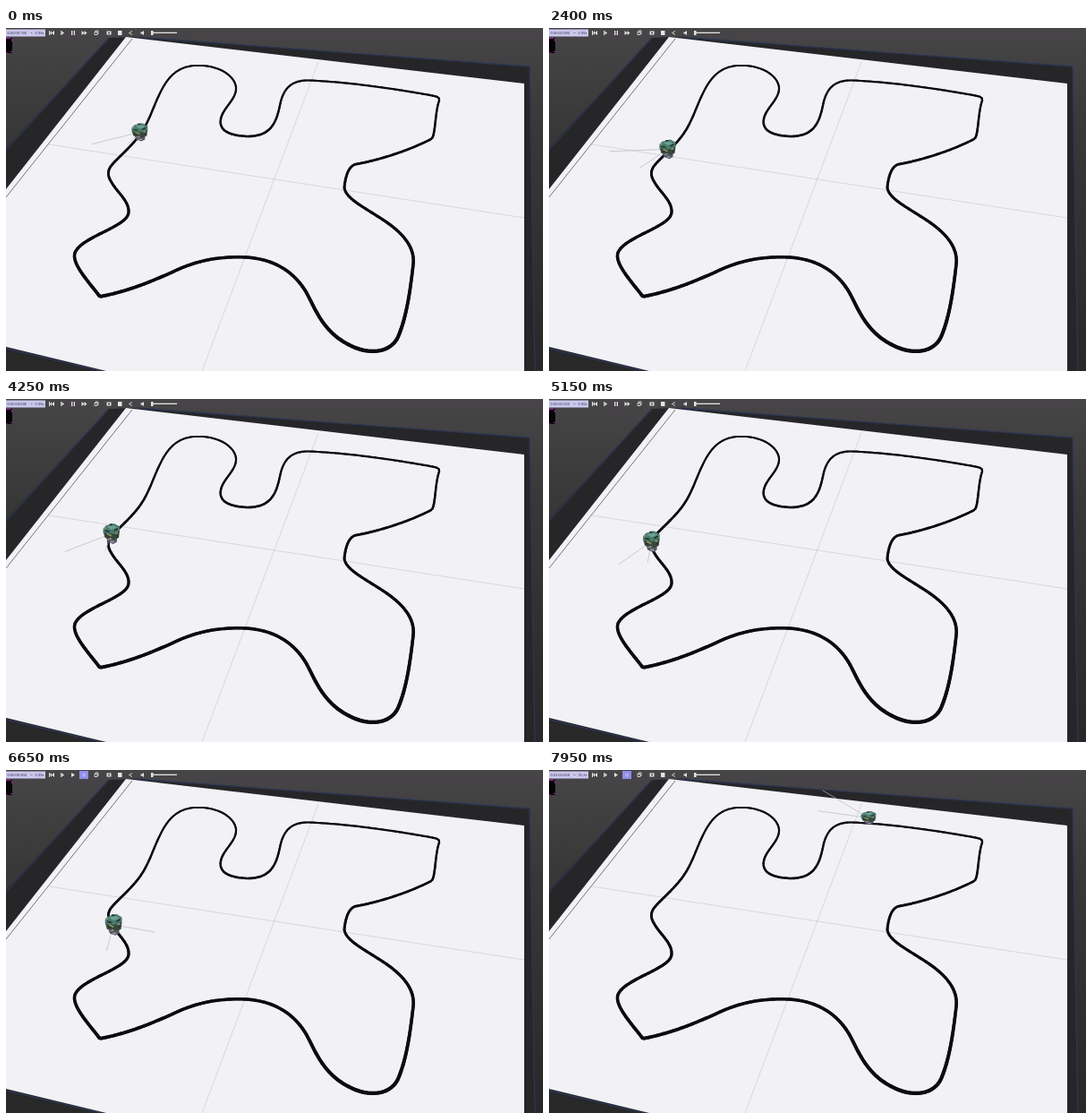
Write an HTML page that moves like this. It is 600x383 px and loops after 8000 ms.

```html
<!DOCTYPE html>
<html lang="en">
<head>
<meta charset="utf-8">
<title>Line follower</title>
<style>
  html, body { margin: 0; width: 100%; height: 100%; overflow: hidden; background: #333; }
  svg { display: block; width: 100%; height: 100%; }
  text { font: 4.1px "Liberation Sans", Arial, sans-serif; fill: #34324d; }
</style>
</head>
<body>
<svg viewBox="0 0 600 383">
  <defs>
    <linearGradient id="room" x2="0" y2="1">
      <stop offset="0" stop-color="#474547"/>
      <stop offset=".3" stop-color="#383838"/>
      <stop offset="1" stop-color="#282828"/>
    </linearGradient>
  </defs>
  <rect width="600" height="383" fill="url(#room)"/>

  <!-- Arena -->
  <path d="M115 11L146 10L585 43L591 383H100L0 361V134Z" fill="#262628"/>
  <path d="M115 11L0 136M146 10L585 43L591 383M0 358L106 383" fill="none" stroke="#2c3554" stroke-width="1.4"/>
  <path d="M134 10L579 62V383H112L0 356V180Z" fill="#f2f1f6"/>
  <path d="M141 12L0 189" stroke="#55555a" stroke-width=".8"/>
  <path d="M48 130L579 212M349 38L219 383" stroke="#bfbec5" stroke-width=".6" stroke-dasharray="3 .5"/>
  <path id="track" fill="none" d="M153 114C143 130 129 141 119 152C111 161 115 168 119 174
    C125 184 138 194 137 206C136 222 84 233 77 251C73 263 92 283 105 300
    C140 293 165 282 196 268C220 258 243 255 268 256C300 258 322 272 336 296
    C347 317 356 342 388 356C408 365 430 362 438 345C448 322 452 290 455 264
    C458 238 431 220 414 209.5C396 198 379 189 378 178C379 168 382 154 391 152
    C415 148 450 137 475 124C480 122 479 95 484 81C485 77 480 76 474 75
    C440 69 390 61 340 58.5C322 58 312 64 307 82C303 100 300 121 270 121
    C245 120 236 112 241 98C246 86 258 78 257 66C255 52 236 41 213 42
    C190 42 179 58 172 73C165 87 161 101 153 114Z"/>
  <g id="line" stroke="#0b0b12" stroke-linecap="round"></g>

  <!-- Robot -->
  <path id="rays" fill="none" stroke="#b9b9bd" stroke-width=".7"/>
  <g id="robot">
    <path d="M-6 3L6 2L6 8L2 10L-4 8Z" fill="#555663"/>
    <path d="M-4 5L3 5M-1 8H3" stroke="#a3a2af" stroke-width="1.3"/>
    <path d="M-9 -2L9 -3L8 4L3 6L-7 4Z" fill="#37483f"/>
    <path d="M-6 -8L3 -10L9 -7L9 -3L2 0L-9 -1L-9 -5Z" fill="#4a7a6c"/>
    <path d="M-5 -7L3 -8L6 -6L0 -4Z" fill="#6f9d98"/>
    <path d="M-7 -3L-2 -2M3 -3L7 -5M-6 2H-3M5 2H7M-2 -9H1" stroke="#22332f" stroke-width="1.5"/>
    <path d="M-5 0L0 2M4 0L7 -1M-8 -5L-6 -6" stroke="#8c9b62" stroke-width="1.4"/>
    <circle cx="-1" cy="5" r="1" fill="#b27f91"/>
  </g>

  <!-- Toolbar -->
  <rect x="0" y="11" width="7" height="17" fill="#050507"/>
  <path d="M0 11.5H5M6.5 12V15M5 26.5H7M0 28H2" stroke="#a01c9a"/>
  <rect y="1.5" width="44" height="8" fill="#cbc8ee"/>
  <text id="clock" x="1.5" y="7"></text>
  <text id="rate" x="42.5" y="7" text-anchor="end"></text>
  <path d="M27.5 5.5H29.5" stroke="#55536c" stroke-width=".6"/>
  <rect id="highlight" x="82" y="1" width="10" height="9" fill="#918ce8"/>
  <g fill="#e4e4e4">
    <path d="M48 3H49V8H48ZM51 3V8L49 5.5ZM54 3V8L51 5.5Z"/>
    <path d="M61 3H61.8V8H61ZM62.3 3.2L65 5.5L62.3 7.8Z"/>
    <path id="pause" d="M73 3H74.3V8H73ZM75.7 3H77V8H75.7Z"/>
    <path id="play" d="M73 3L77 5.5L73 8Z"/>
    <path d="M84.5 3L87.5 5.5L84.5 8ZM87.5 3L90.5 5.5L87.5 8Z" id="forward"/>
    <path d="M112.5 3.5H117.5V7.5H112.5ZM125 3H129.5V8H125ZM150.5 4.5H152L154 3V8L152 6.5H150.5Z"/>
    <rect x="163" y="4.7" width="28" height="1.3"/>
    <rect x="162" y="3" width="2.5" height="5"/>
  </g>
  <path id="pauseFast" d="M86 3.5V7.5M88 3.5V7.5" stroke="#c9c6f6"/>
  <path d="M99 4.5H102V7.5H99ZM100 4V3H103V6.5H102M141 3.5L137.5 5.5L141 7.5" fill="none" stroke="#ddd" stroke-width=".9"/>
  <circle cx="115" cy="5.5" r="1.1" fill="#444"/>
</svg>
<script>
const $ = id => document.getElementById(id);
const LOOP = 8000, STEP = 50, FAST_START = 6690, BUTTON_PRESS = 6600;
const track = $("track"), total = track.getTotalLength();
const at = s => track.getPointAtLength(s);

// Sample the track once; the line gets thicker towards the viewer.
const samples = Array.from({ length: 601 }, (_, i) => at(total * i / 600));
$("line").innerHTML = samples.slice(1).map((p, i) => {
  const q = samples[i];
  return `<path d="M${q.x} ${q.y}L${p.x} ${p.y}" stroke-width="${1.8 + p.y * 0.0065}"/>`;
}).join("");

function distanceNear(x, y) {
  let best = 0, bestGap = Infinity;
  for (let s = 0; s < total - 20; s += 0.5) {
    const p = at(s), gap = Math.hypot(p.x - x, p.y - y);
    if (gap < bestGap) { bestGap = gap; best = s; }
  }
  return best;
}

// Time and place on the track.
const route = [
  [0, 149, 119], [1250, 143, 125], [2400, 132, 138], [4250, 117, 153],
  [5150, 114, 162], [FAST_START, 121, 176], [7650, 405, 148],
  [7950, 357, 60], [LOOP, 313, 67]
].map(([t, x, y]) => [t, distanceNear(x, y)]);

// Time, then angle and length of both sensor rays.
const sensors = [
  [0, 166, 55, 135, 18], [1250, 171, 58, 140, 20], [2400, 178, 65, 146, 37],
  [4250, 159, 56, 110, 20], [5150, 145, 44, 100, 24], [5900, 110, 28, 15, 50],
  [6650, 105, 30, 10, 47], [FAST_START, 105, 30, 10, 47]
];

function interpolate(keys, t) {
  let i = 1;
  while (i < keys.length - 1 && keys[i][0] < t) i++;
  const a = keys[i - 1], b = keys[i];
  const k = Math.min(1, (t - a[0]) / (b[0] - a[0]));
  return a.slice(1).map((v, j) => v + (b[j + 1] - v) * k);
}

function clockText(ms) {
  const pad = (n, size) => String(Math.floor(n)).padStart(size, "0");
  return `0:${pad(ms / 60000, 2)}:${pad(ms / 1000 % 60, 2)}:${pad(ms % 1000, 3)}`;
}

function show(id, visible) {
  $(id).style.display = visible ? "" : "none";
}

function draw(t) {
  const fast = t > FAST_START, pressed = t >= BUTTON_PRESS;
  const [s] = interpolate(route, t);
  const p = at(s), ahead = at(Math.min(total, s + 4));
  const x = p.x, y = p.y - (fast ? 6 : 3);
  const scaleX = Math.min(1.2, 0.87 + p.y * 0.001);
  const scaleY = Math.min(1.2, 0.5 + p.y * 0.0042);
  $("robot").setAttribute("transform", `translate(${x} ${y}) scale(${scaleX} ${scaleY})`);

  const heading = Math.atan2(ahead.y - p.y, ahead.x - p.x) * 180 / Math.PI;
  const [angleA, lengthA, angleB, lengthB] = fast
    ? [heading + 4, 57, heading + 27, 60] : interpolate(sensors, t);
  const ray = (angle, length) => {
    const a = angle * Math.PI / 180;
    return `M${x} ${y}l${Math.cos(a) * length} ${Math.sin(a) * length}`;
  };
  $("rays").setAttribute("d", ray(angleA, lengthA) + ray(angleB, lengthB));

  const simulated = 786 + t * 0.92 + Math.max(0, t - FAST_START) * 43.3;
  $("clock").textContent = clockText(simulated);
  $("rate").textContent = fast ? "31.2x" : "0.99x";
  show("highlight", pressed);
  show("pauseFast", pressed);
  show("play", pressed);
  show("pause", !pressed);
  show("forward", !pressed);
}

const start = performance.now();
function tick() {
  const t = (performance.now() - start) % LOOP;
  draw(Math.floor(t / STEP) * STEP);
  requestAnimationFrame(tick);
}
tick();
</script>
</body>
</html>
```
